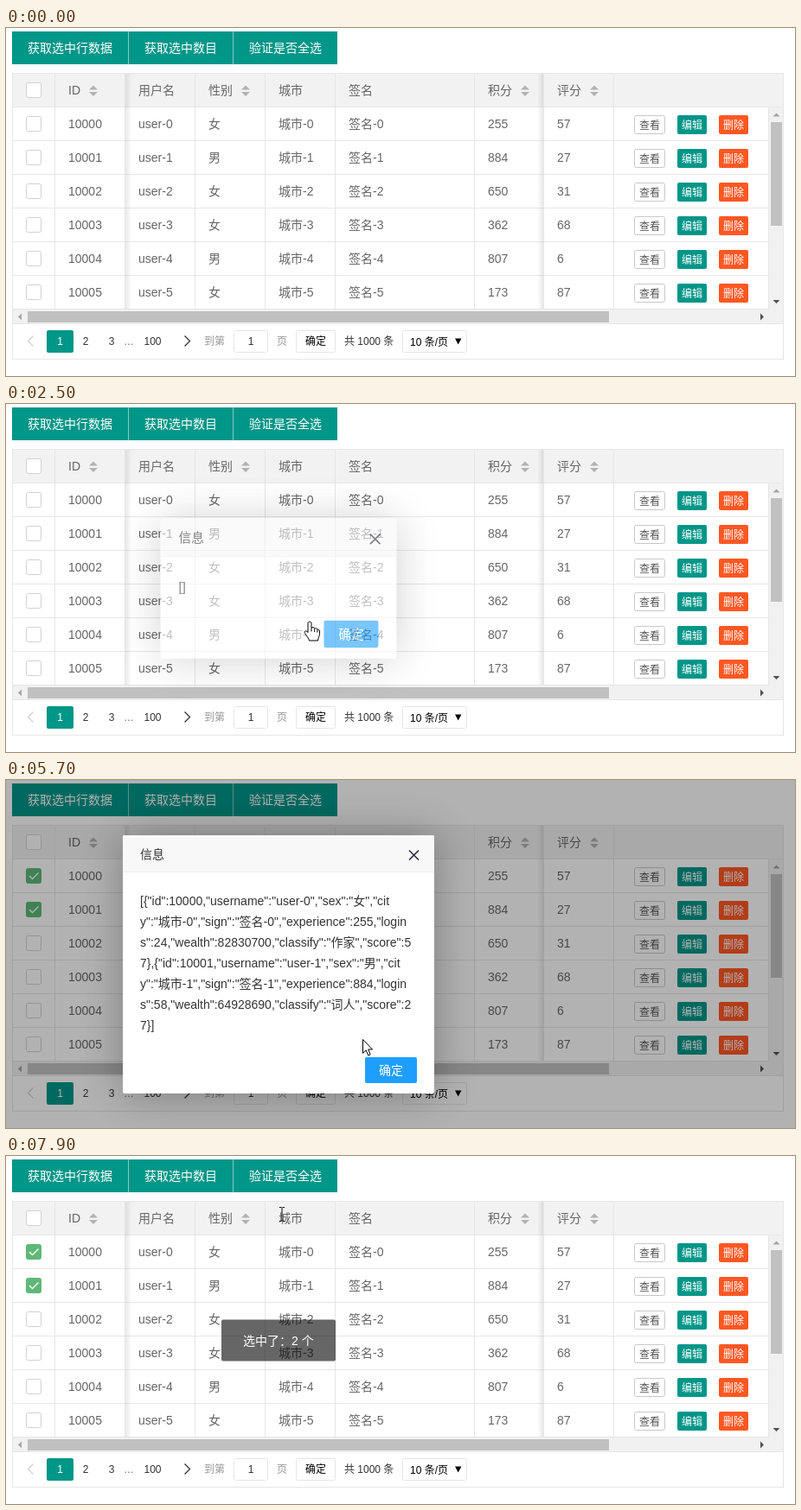
Animation of 912 by 403 pixels, one loop 8 s. Source, as an HTML page:

```html
<!DOCTYPE html>
<html lang="zh-CN">
<head>
<meta charset="utf-8">
<title>Table</title>
<style>
html, body { margin: 0; width: 100%; height: 100%; overflow: hidden; background: #fff; }
svg { display: block; width: 912px; height: 403px; cursor: default; }
text { font-family: "Liberation Sans", "Noto Sans CJK SC", "Noto Sans CJK", sans-serif; font-size: 14px; fill: #666; }
.s { font-size: 12px; }
</style>
</head>
<body>
<script>
const NS = 'http://www.w3.org/2000/svg';
const TEAL = '#009688', GREEN = '#5fb878', LINE = '#e6e6e6';
const LOOP = 8000, STEP = 100;

function el(parent, tag, attrs = {}, content) {
  const n = document.createElementNS(NS, tag);
  for (const k in attrs) n.setAttribute(k, attrs[k]);
  if (content !== undefined) n.textContent = content;
  parent.appendChild(n);
  return n;
}
const rect = (p, x, y, width, height, fill, more) =>
  el(p, 'rect', { x, y, width, height, fill, ...more });
const frame = (p, x, y, w, h, stroke, rx = 2) =>
  rect(p, x + .5, y + .5, w - 1, h - 1, '#fff', { stroke, rx });
const label = (p, x, y, s, more) => el(p, 'text', { x, y, ...more }, s);
const small = (p, x, y, s, fill = '#333', more) => label(p, x, y, s, { class: 's', style: 'fill:' + fill, ...more });
const path = (p, d, more) => el(p, 'path', { d, fill: 'none', ...more });
const tri = (p, d, fill) => path(p, d, { fill });
const show = (n, on) => n.setAttribute('display', on ? 'inline' : 'none');
const MID = { 'text-anchor': 'middle' };
const white = { style: 'fill:#fff' };

const svg = el(document.body, 'svg', { viewBox: '0 0 912 403' });
rect(svg, 0, 0, 912, 403, '#fff');

// fixed column shadows
const defs = el(svg, 'defs');
[['shL', .09, 0], ['shR', 0, .09]].forEach(([id, a, b]) => {
  const g = el(defs, 'linearGradient', { id });
  el(g, 'stop', { offset: 0, 'stop-opacity': a });
  el(g, 'stop', { offset: 1, 'stop-opacity': b });
});

// toolbar
const tools = [[7, 134, '获取选中行数据', 25], [142, 120, '获取选中数目', 160], [263, 120, '验证是否全选', 281]]
  .map(([x, w, s, tx]) => {
    const g = el(svg, 'g');
    rect(g, x, 4, w, 38, TEAL);
    label(g, tx, 28, s, white);
    return { g, x, w };
  });
[141, 262].forEach(x => rect(svg, x, 4, 1, 38, '#80cbc4'));

// table frame and header
frame(svg, 7, 52, 892, 332, LINE, 0);
rect(svg, 8, 53, 890, 38, '#f2f2f2');

const rowTop = i => 92 + 39 * i;
const sexes = '女男女女男女', points = [255, 884, 650, 362, 807, 173], scores = [57, 27, 31, 68, 6, 87];

function checkbox(y) {
  const box = frame(svg, 23, y, 18, 18, '#d2d2d2');
  const tick = path(svg, `M27 ${y + 9}l3.5 3.5 7-7`, { stroke: '#fff', 'stroke-width': 1.4 });
  show(tick, false);
  return { box, tick, y };
}

function action(x, w, y, s, bg) {
  if (bg) rect(svg, x, y, w, 22, bg, { rx: 2 });
  else frame(svg, x, y, w, 22, '#c9c9c9');
  small(svg, x + w / 2, y + 15.5, s, bg ? '#fff' : '#555', { ...MID, 'font-weight': bg ? 500 : 400 });
}

const rows = points.map((p, i) => {
  const y = rowTop(i), bg = rect(svg, 8, y, 874, 38, '#fff');
  rect(svg, 8, y + 38, 874, 1, LINE);
  [[72, 10000 + i], [153, 'user-' + i], [234, sexes[i]], [315, '城市-' + i], [396, '签名-' + i], [557, p], [637, scores[i]]]
    .forEach(([x, s]) => label(svg, x, y + 24, s));
  action(726, 36, y + 9, '查看');
  action(776, 34, y + 9, '编辑', TEAL);
  action(824, 34, y + 9, '删除', '#ff5722');
  return { bg, y, ...checkbox(y + 10) };
});

rect(svg, 8, 91, 890, 1, LINE);
checkbox(63);
[[72, 'ID', 101], [153, '用户名'], [234, '性别', 277], [315, '城市'], [396, '签名'], [557, '积分', 600], [637, '评分', 680]]
  .forEach(([x, s, sort]) => {
    label(svg, x, 77, s);
    if (sort) {
      tri(svg, `M${sort - 5} 71.5l5-5 5 5z`, '#b2b2b2');
      tri(svg, `M${sort - 5} 74l5 5 5-5z`, '#b2b2b2');
    }
  });
[56, 137, 218, 299, 380, 541, 621, 702].forEach(x => rect(svg, x, 53, 1, 273, LINE));
rect(svg, 881, 92, 1, 234, LINE);
rect(svg, 138, 53, 7, 272, 'url(#shL)');
rect(svg, 614, 53, 7, 272, 'url(#shR)');

// scrollbars
rect(svg, 882, 92, 16, 234, '#f1f1f1');
rect(svg, 884, 109, 13, 120, '#c1c1c1');
tri(svg, 'M886.5 102.5l4-4 4 4z', '#a3a3a3');
tri(svg, 'M886.5 315l4 4 4-4z', '#505050');
rect(svg, 8, 326, 890, 16, '#f1f1f1');
rect(svg, 25, 328, 672, 13, '#c1c1c1');
tri(svg, 'M18 330.5l-4 4 4 4z', '#a3a3a3');
tri(svg, 'M872 330.5l4 4-4 4z', '#505050');
rect(svg, 8, 342, 890, 1, LINE);

// pagination
path(svg, 'M31.5 356.5l-6 6 6 6', { stroke: '#d2d2d2', 'stroke-width': 1.3 });
rect(svg, 47, 350, 31, 26, TEAL, { rx: 2 });
small(svg, 62.5, 367, 1, '#fff', MID);
[[92, 2], [122, 3], [169.5, 100]].forEach(([x, s]) => small(svg, x, 367, s, '#333', MID));
small(svg, 136, 367, '…', '#666');
path(svg, 'M206.5 356.5l6 6-6 6', { stroke: '#333', 'stroke-width': 1.3 });
small(svg, 229, 367, '到第', '#999');
frame(svg, 263, 350, 40, 26, LINE);
small(svg, 283, 367, 1, '#333', MID);
small(svg, 313, 367, '页', '#999');
frame(svg, 335, 350, 46, 26, LINE);
small(svg, 346, 367, '确定', '#000');
small(svg, 391, 367, '共 1000 条');
frame(svg, 458, 350, 75, 26, LINE);
small(svg, 467, 367.5, '10 条/页', '#000');
tri(svg, 'M519 359.5h7.4l-3.7 7z', '#000');

// overlays
const shade = rect(svg, 0, 0, 912, 403, '#000', { opacity: .3 });

function dialog(w, lines, open, close) {
  const h = 131 + 24 * lines.length, l = -w / 2, t = -h / 2, dark = { style: 'fill:#333' };
  const g = el(svg, 'g');
  rect(g, l + 1, t + 1, w, h, '#000', { opacity: .3, style: 'filter:blur(25px)' });
  rect(g, l, t, w, h, '#fff', { rx: 2 });
  rect(g, l, t, w, 42, '#f8f8f8', { rx: 2 });
  rect(g, l, t + 42, w, 1, '#eee');
  label(g, l + 20, t + 26.5, '信息', dark);
  const cx = -l - 23.5, cy = t + 23;
  path(g, `M${cx - 5.5} ${cy - 5.5}l11 11m0-11l-11 11`, { stroke: '#2d2c3b', 'stroke-width': 1.6 });
  lines.forEach((s, i) => label(g, l + 20, t + 80.5 + 24 * i, s, dark));
  rect(g, -l - 80, -t - 42, 60, 30, '#1e9fff', { rx: 2 });
  label(g, -l - 50, -t - 22, '确定', { ...white, ...MID });
  return { g, open, close };
}
const dialogs = [
  dialog(260, ['[]'], 1513, 2450),
  dialog(360, [
    '[{"id":10000,"username":"user-0","sex":"女","cit',
    'y":"城市-0","sign":"签名-0","experience":255,"login',
    's":24,"wealth":82830700,"classify":"作家","score":5',
    '7},{"id":10001,"username":"user-1","sex":"男","cit',
    'y":"城市-1","sign":"签名-1","experience":884,"login',
    's":58,"wealth":64928690,"classify":"词人","score":2',
    '7}]'
  ], 4597, 6418)
];

const toast = el(svg, 'g');
rect(toast, -66, -24, 132, 48, '#000', { rx: 2, opacity: .6 });
label(toast, -41, 5, '选中了：2 个', white);

// pointers, hot spot at the origin
const ink = { fill: '#fff', stroke: '#000', 'stroke-linejoin': 'round' };
const pointers = {
  arrow: g => path(g, 'M.5 .5V16.5L4.2 13 6.8 19 9.2 18 6.7 12H11.5Z', ink),
  hand: g => {
    path(g, 'M-2 2C-2-.5 2-.5 2 2V7.5C3 6 5.5 6.5 5.7 8.2 6.7 7.2 8.6 7.7 8.9 9.4 10 8.7 11.5 9.4 11.5 11V14.5C11.5 17 9.6 18.5 9.6 22H-.5C-.8 19.5-3.5 17-5.5 13.5-7 11-4.5 9.5-2 12.5Z', ink);
    path(g, 'M2 7.5V11.5M5.7 8.5V12M8.9 9.5V12.5', { stroke: '#000' });
  },
  beam: g => path(g, 'M-3-7.5H-.5M.5-7.5H3M0-7V8M-3 8.5H-.5M.5 8.5H3', { stroke: '#000' })
};
for (const k in pointers) {
  const g = el(svg, 'g');
  pointers[k](g);
  pointers[k] = g;
}

// time, x, y, pointer kind from this time on
const track = [
  [200, 823, 92, 'arrow'], [600, 400, 76, 'arrow'], [1000, 92, 42, 'arrow'], [1100, 86, 36, 'hand'],
  [1300, 78, 29, 'hand'], [1500, 78, 29, 'arrow'], [1700, 78, 29, 'arrow'], [2200, 386, 262, 'hand'],
  [2400, 384, 261, 'hand'], [2500, 351, 252, 'hand'], [2600, 190, 178, 'arrow'], [2700, 52, 122, 'arrow'],
  [2900, 46, 118, 'arrow'], [3100, 31, 111, 'hand'], [3400, 31, 112, 'hand'], [3600, 35, 139, 'arrow'],
  [3700, 33, 152, 'hand'], [4100, 33, 152, 'hand'], [4200, 40, 130, 'arrow'], [4400, 92, 30, 'hand'],
  [4500, 94, 29, 'hand'], [4600, 100, 38, 'arrow'], [4700, 125, 80, 'arrow'], [4900, 341, 259, 'arrow'],
  [5500, 443, 317, 'arrow'], [5600, 443, 317, 'arrow'], [6000, 318, 250, 'arrow'], [6200, 455, 328, 'hand'],
  [6300, 464, 335, 'hand'], [6500, 464, 335, 'arrow'], [6600, 464, 335, 'arrow'], [7200, 210, 50, 'arrow'],
  [7300, 202, 32, 'hand'], [7400, 200, 29, 'hand'], [7600, 200, 29, 'hand'], [7800, 290, 58, 'arrow'], [7900, 319, 67, 'beam']
];

function pointerAt(t) {
  if (t < track[0][0]) return null;
  let i = track.length - 1;
  while (track[i][0] > t) i--;
  const a = track[i], b = track[i + 1] || a;
  const k = b === a ? 0 : (t - a[0]) / (b[0] - a[0]);
  return { x: a[1] + (b[1] - a[1]) * k, y: a[2] + (b[2] - a[2]) * k, kind: a[3] };
}
const inside = (p, x, y, w, h) => p && p.x >= x && p.x < x + w && p.y >= y && p.y < y + h;

// CSS "ease": cubic-bezier(.25, .1, .25, 1)
function ease(x) {
  if (x <= 0) return 0;
  if (x >= 1) return 1;
  const curve = (u, a, b) => 3 * a * u * (1 - u) ** 2 + 3 * b * u * u * (1 - u) + u ** 3;
  let lo = 0, hi = 1;
  for (let i = 0; i < 24; i++) {
    const m = (lo + hi) / 2;
    if (curve(m, .25, .25) < x) lo = m; else hi = m;
  }
  return curve(lo, .1, 1);
}

function place(g, t, open, close) {
  const on = t >= open && t < close + 200;
  show(g, on);
  if (!on) return;
  const a = ease((t - open) / 300);
  let scale = .5 + .5 * a, alpha = a;
  if (t >= close) {
    const k = (t - close) / 200;
    alpha = 1 - ease(k);
    scale = k < .3 ? 1 + .05 * ease(k / .3) : 1.05 - .35 * ease((k - .3) / .7);
  }
  g.setAttribute('transform', `translate(315 213.5) scale(${scale})`);
  g.setAttribute('opacity', alpha);
}

const checkedAt = [3200, 4100];

function draw(t) {
  const p = pointerAt(t), late = pointerAt(t - STEP);
  const shaded = dialogs.some(d => t >= d.open - 15 && t < d.close);
  const busy = dialogs.some(d => t >= d.open - 15 && t < d.close + 200);
  show(shade, shaded);
  tools.forEach(b => b.g.setAttribute('opacity', !busy && inside(p, b.x, 4, b.w, 38) ? .8 : 1));
  rows.forEach((r, i) => {
    const on = t >= checkedAt[i], hover = !busy && inside(late, 23, r.y, 18, 18);
    r.bg.setAttribute('fill', !busy && inside(p, 8, rowTop(i), 874, 39) ? '#f2f2f2' : '#fff');
    r.box.setAttribute('fill', on ? GREEN : '#fff');
    r.box.setAttribute('stroke', on || hover ? GREEN : '#d2d2d2');
    show(r.tick, on);
  });
  dialogs.forEach(d => place(d.g, t, d.open, d.close));
  place(toast, t, 7480, 1e5);
  for (const k in pointers) {
    const on = p && p.kind === k;
    show(pointers[k], on);
    if (on) pointers[k].setAttribute('transform', `translate(${Math.round(p.x)} ${Math.round(p.y)})`);
  }
}

const start = performance.now();
function tick() {
  const t = Math.max(0, performance.now() - start) % LOOP;
  draw(Math.floor(t / STEP) * STEP);
  requestAnimationFrame(tick);
}
draw(0);
requestAnimationFrame(tick);
</script>
</body>
</html>
```
